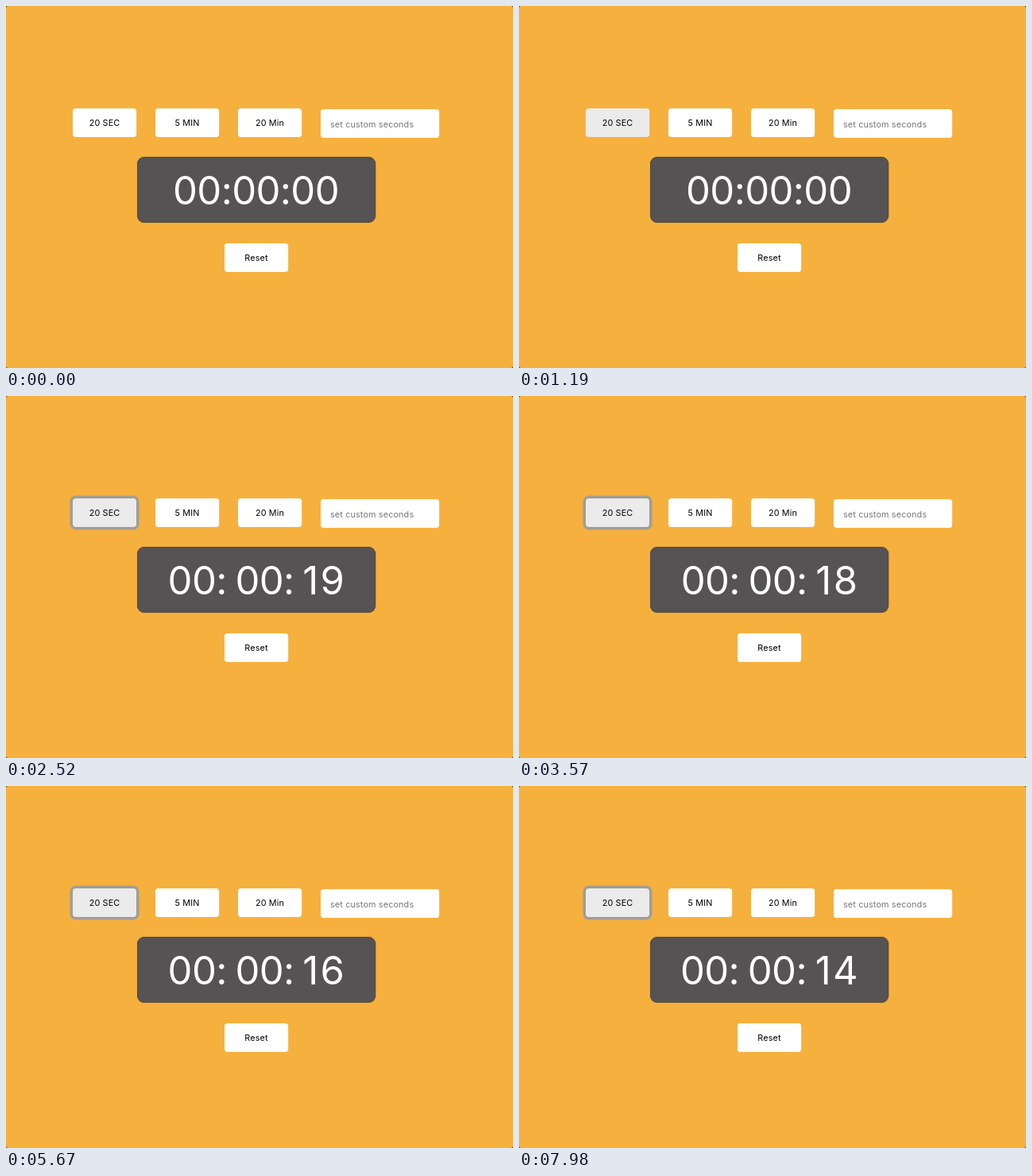
These frames come from a looping animation (638 px wide and 456 px high, 8000 ms). An HTML page:

```html
<!DOCTYPE html>
<html lang="en">
<head>
<meta charset="utf-8">
<title>Countdown timer</title>
<style>
  html, body { margin: 0; width: 100%; height: 100%; overflow: hidden; background: #5a4420; }
  #stage {
    position: relative; width: 638px; height: 456px; border-radius: 3px;
    background: #f6b03d; color: #000;
    font: 10.8px Inter, sans-serif; letter-spacing: .15px;
  }
  #stage div {
    position: absolute; box-sizing: border-box;
    display: flex; align-items: center; justify-content: center; white-space: pre;
  }
  .button, .input {
    height: 36px; border-radius: 4px; background: #fff;
    box-shadow: .2px 0 1px rgba(255, 255, 255, .6);
  }
  .button { top: 129px; width: 80px; }
  #stage .input {
    left: 396px; top: 130px; width: 149px; padding: 2px 0 0 12px;
    color: #757575; justify-content: flex-start;
  }
  #clock {
    left: 165px; top: 190px; width: 300px; height: 83px; padding: 2px 1px 0 0;
    border-radius: 9px; background: #565354;
    box-shadow: inset 0 0 0 1px #564a3e, .4px 0 1px rgba(86, 74, 62, .6);
    color: #fff; font-size: 49px; letter-spacing: -.6px; word-spacing: -2.5px;
  }
  #clock.running { font-feature-settings: "calt" 0; }
  .one { margin-right: 3px; }
  .focused { box-shadow: 0 0 1px 3.5px #9f9d97; }
</style>
</head>
<body>
<div id="stage">
  <div class="button" id="start" style="left:84px">20 SEC</div>
  <div class="button" style="left:188px">5 MIN</div>
  <div class="button" style="left:292px">20 Min</div>
  <div class="input">set custom seconds</div>
  <div id="clock"><span></span></div>
  <div class="button" style="left:275px;top:299px">Reset</div>
</div>
<script>
  const LOOP = 8000, HOVER = 700, HOVER_FADE = 200, PRESS = 1400, START = 1470, TICK = 1050;
  const startButton = document.getElementById('start');
  const clock = document.getElementById('clock');
  const digits = clock.firstChild;
  let shown = '';

  function clockText(t) {
    if (t < START) return '00:00:00';
    const seconds = 20 - Math.floor((t - START) / TICK);
    return '00: 00: ' + String(seconds).padStart(2, '0');
  }

  function draw(t) {
    const hover = Math.min(1, Math.max(0, (t - HOVER) / HOVER_FADE));
    const shade = Math.round(255 - 20 * hover);
    startButton.style.background = `rgb(${shade}, ${shade}, ${shade})`;
    startButton.classList.toggle('focused', t >= PRESS);
    clock.classList.toggle('running', t >= START);

    const text = clockText(t);
    if (text === shown) return;
    shown = text;
    // The narrow 1 gets a little extra room.
    digits.innerHTML = text.replace('1', '<span class="one">1</span>');
  }

  const begin = performance.now();
  function frame() {
    draw((performance.now() - begin) % LOOP);
    requestAnimationFrame(frame);
  }
  frame();
</script>
</body>
</html>
```
